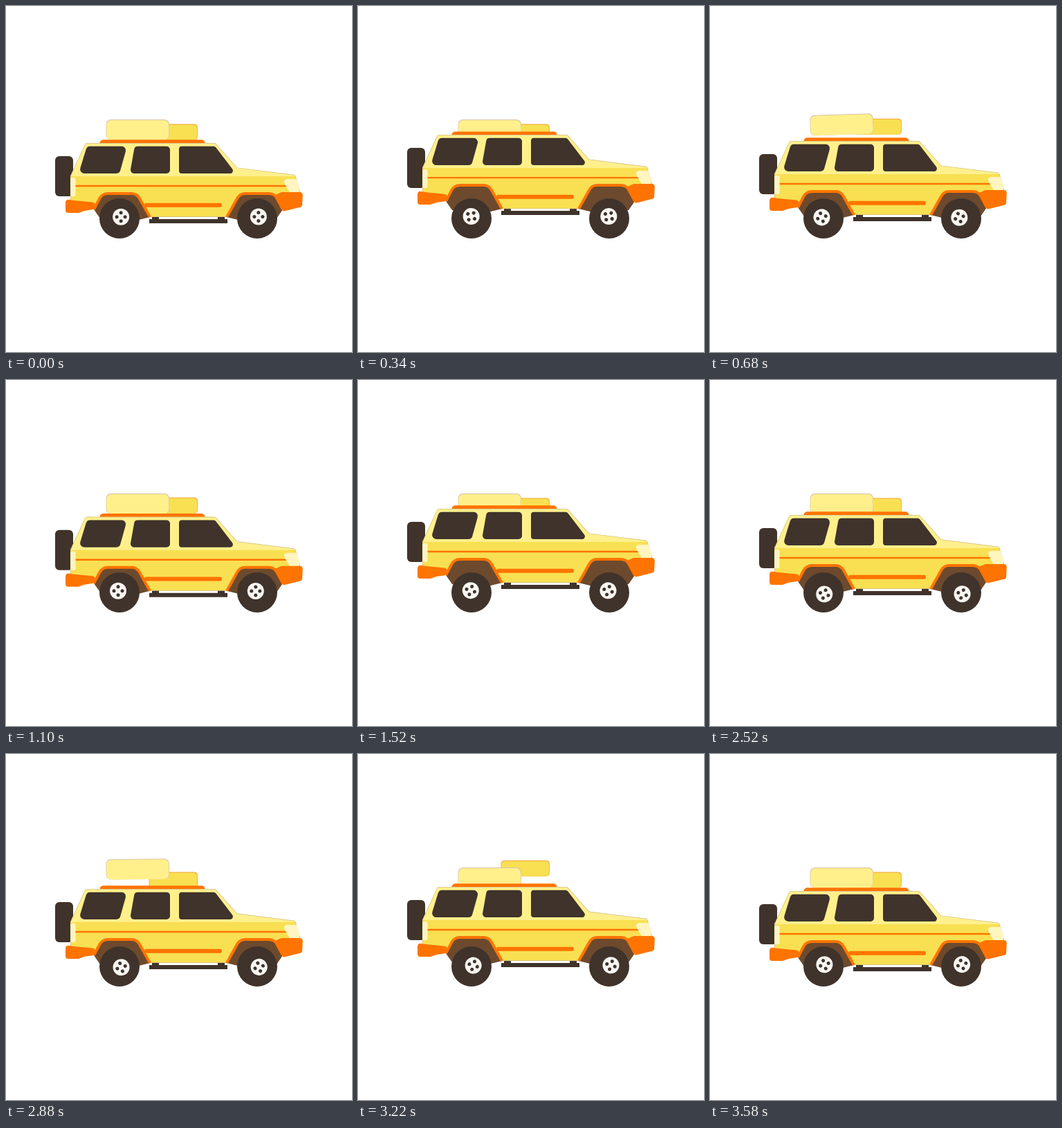
An HTML page with a canvas that plays this animation: 500 px wide and 500 px high, repeating every 3.6 s.

```html
<!DOCTYPE html>
<html lang="en">
<head>
<meta charset="utf-8">
<title>Bouncing car</title>
<style>
html, body { margin: 0; width: 100%; height: 100%; overflow: hidden; background: #fff; }
canvas { display: block; width: 500px; height: 500px; }
</style>
</head>
<body>
<canvas id="stage" width="500" height="500"></canvas>
<script>
const ctx = document.getElementById('stage').getContext('2d');
const DARK = '#3f332b', YELLOW = '#f8e052', LIGHT = '#fff08c', ORANGE = '#ff7400',
      BROWN = '#6d4a2d', PALE = '#fff5c0', EDGE = 'rgba(190,165,160,.65)';
const CYCLE = 1200, TURN = 400;
const AXLE = 307, REAR = 164, FRONT = 363;
const ROOF = 198, WAIST = 246, SILL = 305;

const sine = x => (1 - Math.cos(Math.PI * x)) / 2;
const cubic = x => x < .5 ? 4 * x ** 3 : 1 - 4 * (1 - x) ** 3;

// Rises from 0 to 1 between start and peak, then returns by end.
function hop(t, start, peak, end, ease) {
  if (t <= start || t >= end) return 0;
  return ease(t < peak ? (t - start) / (peak - start) : (end - t) / (end - peak));
}

// Polygon whose corners are rounded with radius r.
function poly(points, r, fill) {
  const first = points[0], last = points.at(-1);
  ctx.beginPath();
  ctx.moveTo((first[0] + last[0]) / 2, (first[1] + last[1]) / 2);
  points.forEach((p, i) => ctx.arcTo(...p, ...points[(i + 1) % points.length], r));
  ctx.closePath();
  ctx.fillStyle = fill;
  ctx.fill();
}

// Trapezoid whose sides shift outwards by leanL and leanR at the bottom.
function pane(left, right, top, bottom, leanL, leanR, r, fill) {
  poly([[left, top], [right, top], [right + leanR, bottom], [left - leanL, bottom]], r, fill);
}

function box(x, y, w, h, r, fill) {
  ctx.beginPath();
  ctx.roundRect(x, y, w, h, r);
  ctx.fillStyle = fill;
  ctx.fill();
}

function stripe(left, right, y, width) {
  box(left, y - width / 2, right - left, width, width / 2, ORANGE);
}

function disc(x, y, r, fill) {
  ctx.beginPath();
  ctx.arc(x, y, r, 0, 2 * Math.PI);
  ctx.fillStyle = fill;
  ctx.fill();
}

function bag(x, y, w, h, r, fill, edge, lift, tilt) {
  ctx.save();
  ctx.translate(x + w / 2, y + h / 2 - lift);
  ctx.rotate(tilt);
  box(-w / 2, -h / 2, w, h, r, edge);
  box(-w / 2 + .7, -h / 2 + 1, w - 1.4, h - 1, r, fill);
  ctx.restore();
}

function wheel(x, angle, phase) {
  const wobble = 2.9;
  disc(x, AXLE, 29, DARK);
  ctx.save();
  ctx.translate(x + wobble * Math.cos(angle + phase), AXLE - .2 + wobble * Math.sin(angle + phase));
  ctx.rotate(angle);
  disc(0, 0, 12, '#f8f6f2');
  for (let i = 0; i < 4; i++) {
    ctx.rotate(Math.PI / 2);
    disc(6, 0, 2.5, DARK);
  }
  ctx.restore();
}

// Wheel arch; side is 1 when the sill lies to its right, -1 when to its left.
function arch(x, side) {
  ctx.save();
  ctx.translate(x, 0);
  ctx.scale(side, 1);
  ctx.beginPath();
  ctx.moveTo(-37, 294);
  ctx.arcTo(-25, 271, 25, 271, 14);
  ctx.arcTo(25, 271, 44, SILL, 13);
  ctx.lineTo(44, SILL);
  const rim = new Path2D();
  rim.moveTo(-37, 294);
  rim.arcTo(-25, 271, 25, 271, 14);
  rim.arcTo(25, 271, 44, SILL, 13);
  rim.lineTo(44, SILL);
  const lining = new Path2D(rim);
  lining.lineTo(28, AXLE + 2);
  lining.lineTo(-28, AXLE);
  ctx.fillStyle = BROWN;
  ctx.fill(lining);
  ctx.lineWidth = 4;
  ctx.strokeStyle = ORANGE;
  ctx.stroke(rim);
  ctx.restore();
}

function shell() {
  ctx.save();
  poly([[93, 284], [93, WAIST], [115, ROOF], [302.5, ROOF], [334, 233.5], [418, 244],
        [426, 272], [390, 278], [320, SILL], [207, SILL], [130, 287]], 3, YELLOW);
  ctx.strokeStyle = EDGE;
  ctx.lineWidth = 1.4;
  ctx.clip();
  ctx.fillStyle = LIGHT;
  ctx.fillRect(90, ROOF, 340, WAIST - ROOF);
  ctx.stroke();
  ctx.restore();
}

function body() {
  box(71, 217, 26, 58, 6, DARK);
  pane(139, 284, 193.3, 199, 7, 7, 2, ORANGE);
  shell();

  const top = 202.7, bottom = 242;
  pane(117, 175, top, bottom, 12, -11, 6, DARK);
  pane(186, 237, top, bottom, 7, 0, 5, DARK);
  pane(250, 302, top, bottom, 0, 30, 4, DARK);

  stripe(100, 406, 260, 2.4);
  stripe(200, 312, 287.7, 6);
  box(93, 248, 7.5, 27, 2, PALE);
  pane(399, 421, 250, 269.5, -11, 4.5, 4, PALE);

  arch(REAR, 1);
  arch(FRONT, -1);

  poly([[86, 279], [98, 281], [130, 284], [127, 294], [113, 296], [105, 299], [86, 299]], 4, ORANGE);
  poly([[387, 274], [398, 269], [429, 269], [428, 290], [400, 297]], 4, ORANGE);

  for (const x of [211, 306]) box(x, SILL, 10, 4, 0, DARK);
  box(207, SILL + 3, 113, 6, 0, DARK);
}

function draw(t) {
  ctx.fillStyle = '#fff';
  ctx.fillRect(0, 0, 500, 500);

  const rise = 12 * hop(t, 0, 300, 600, cubic) + 6 * hop(t, 600, 760, 1200, cubic);
  const bigLift = 22 * hop(t, 340, 600, 732, sine);
  const smallLift = 18 * hop(t, 515, 880, 1130, sine);
  const tilt = -.036 * hop(t, 380, 660, 760, sine);

  bag(206.5, 170.5, 70.5, 23, 5, YELLOW, '#f2a53c', smallLift, 0);
  bag(144.5, 164, 91.5, 29.5, 7, LIGHT, '#d9c3a8', bigLift, tilt);

  ctx.save();
  ctx.translate(0, -rise);
  body();
  ctx.restore();

  const angle = t / TURN * 2 * Math.PI;
  wheel(REAR, angle, -.75);
  wheel(FRONT, angle, -.87);
}

function tick() {
  draw(Math.floor(performance.now() / 20) * 20 % CYCLE);
  requestAnimationFrame(tick);
}
tick();
</script>
</body>
</html>
```
